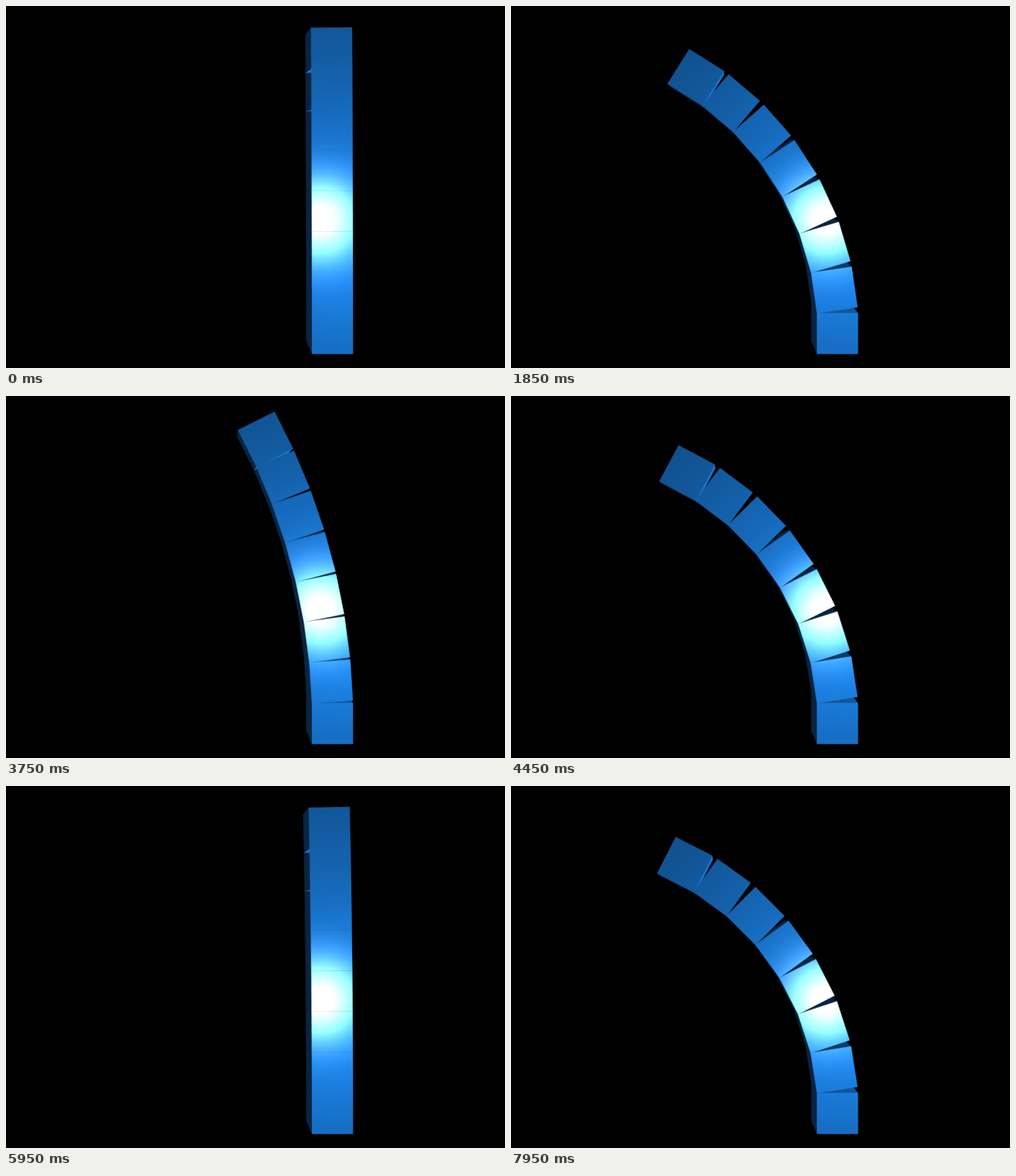
An HTML page with a canvas for the animation above (8 s loop, 600 by 436 pixels).

```html
<!DOCTYPE html>
<html lang="en">
<head>
<meta charset="utf-8">
<title>Bending arm</title>
<style>
  html, body { margin: 0; height: 100%; overflow: hidden; background: #000; }
  canvas { display: block; }
</style>
</head>
<body>
<canvas width="600" height="436"></canvas>
<script>
const canvas = document.querySelector('canvas');
const ctx = canvas.getContext('2d');
const W = 600, H = 436, LOOP = 8000, STEP = 50;

const COUNT = 8, SIZE = 49.1;
const BASE = { x: 368, y: 419 };
const EYE = { x: 255, y: 157, z: 756 };
const LIGHT = { x: 401, y: 276, z: 140 };
const GLOW = { x: 378, y: 257, spread: 2130 };
const COLOR = [30, 144, 255], AMBIENT = 0.25, DIFFUSE = 0.72;

const MAX_BEND = 9 * Math.PI / 180;
const PERIOD = 3005, START = 70, RISE = 670;

// All front faces share one plane, so their light depends on position only.
function makeFrontPattern() {
  const sheet = document.createElement('canvas');
  sheet.width = W;
  sheet.height = H;
  const sheetCtx = sheet.getContext('2d');
  const image = sheetCtx.createImageData(W, H);
  for (let y = 0, i = 0; y < H; y++) {
    for (let x = 0; x < W; x++, i += 4) {
      const lambert = LIGHT.z / Math.hypot(x - LIGHT.x, y - LIGHT.y, LIGHT.z);
      const r2 = (x - GLOW.x) ** 2 + (y - GLOW.y) ** 2;
      const specular = 255 * Math.exp(-r2 / GLOW.spread);
      COLOR.forEach((c, k) => {
        image.data[i + k] = c * (AMBIENT + DIFFUSE * lambert) + specular;
      });
      image.data[i + 3] = 255;
    }
  }
  sheetCtx.putImageData(image, 0, 0);
  return ctx.createPattern(sheet, 'no-repeat');
}
const frontPattern = makeFrontPattern();

function bendAt(t) {
  const swingEnd = START + 2 * PERIOD;
  const phase = t < swingEnd
    ? (t - START) / PERIOD * 2 * Math.PI
    : Math.min(1, (t - swingEnd) / RISE) * Math.PI;
  return MAX_BEND * (1 - Math.cos(phase)) / 2;
}

// Each block is hinged on the front left edge of the one below.
function buildBlocks(bend) {
  const blocks = [];
  let { x, y } = BASE;
  for (let i = 0; i < COUNT; i++) {
    const ux = Math.cos(i * bend) * SIZE, uy = -Math.sin(i * bend) * SIZE;
    const top = { x: x + uy, y: y - ux };
    blocks.push([
      top,
      { x: top.x + ux, y: top.y + uy },
      { x: x + ux, y: y + uy },
      { x, y }
    ]);
    ({ x, y } = top);
  }
  return blocks;
}

function toBack(p) {
  const s = EYE.z / (EYE.z + SIZE);
  return { x: EYE.x + (p.x - EYE.x) * s, y: EYE.y + (p.y - EYE.y) * s };
}

function fillShape(points, paint) {
  ctx.beginPath();
  points.forEach(p => ctx.lineTo(p.x, p.y));
  ctx.closePath();
  ctx.fillStyle = ctx.strokeStyle = paint;
  ctx.fill();
  ctx.stroke();
}

function drawSide(a, b) {
  const nx = (b.y - a.y) / SIZE, ny = (a.x - b.x) / SIZE;
  const mx = (a.x + b.x) / 2, my = (a.y + b.y) / 2;
  if (nx * (EYE.x - mx) + ny * (EYE.y - my) <= 0) return;
  const dx = LIGHT.x - mx, dy = LIGHT.y - my;
  const lambert = Math.max(0, nx * dx + ny * dy) / Math.hypot(dx, dy, LIGHT.z + SIZE / 2);
  const level = AMBIENT + DIFFUSE * lambert;
  fillShape([a, b, toBack(b), toBack(a)], `rgb(${COLOR.map(c => Math.round(c * level))})`);
}

function draw(t) {
  ctx.fillStyle = '#000';
  ctx.fillRect(0, 0, W, H);
  ctx.lineWidth = 0.5;
  ctx.lineJoin = 'round';
  const blocks = buildBlocks(bendAt(t));
  for (const block of blocks) {
    block.forEach((p, i) => drawSide(p, block[(i + 1) % 4]));
  }
  for (const block of blocks) fillShape(block, frontPattern);
}

function tick() {
  const t = performance.now() % LOOP;
  draw(Math.floor(t / STEP) * STEP);
  requestAnimationFrame(tick);
}
tick();
</script>
</body>
</html>
```
